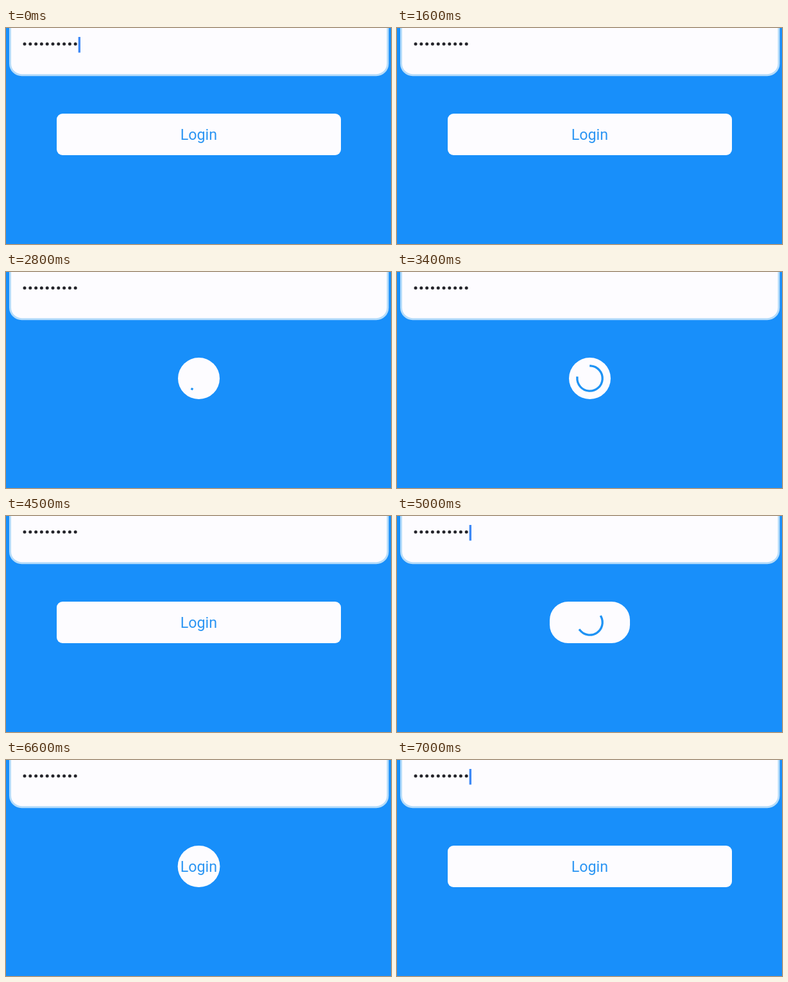
Animation, 600 px wide and 338 px high, one loop 7.1 s. Source, as an HTML page:

```html
<!DOCTYPE html>
<html lang="en">
<head>
<meta charset="utf-8">
<title>Login button</title>
<style>
html, body { margin: 0; width: 100%; height: 100%; overflow: hidden; background: #188ffa; }
svg { display: block; width: 100vw; height: 100vh; }
text { font: 23.2px Roboto, sans-serif; fill: #2b95f3; text-anchor: middle; }
</style>
</head>
<body>
<svg viewBox="0 0 600 338">
  <rect width="600" height="338" fill="#188ffa"/>
  <rect x="6.5" y="-60" width="588.5" height="133.7" rx="18" fill="#fdfcff" stroke="#b5dcfa" stroke-width="3"/>
  <g id="dots" fill="#24242a"></g>
  <rect id="caret" x="112.6" y="14" width="3.4" height="24.5" fill="#3f8af6"/>
  <rect id="button" y="134" height="65" fill="#fdfcff"/>
  <text id="label" x="300.4" y="175.3">Login</text>
  <path id="spinner" fill="none" stroke="#1f93f4" stroke-width="3.3" stroke-linecap="square"/>
</svg>
<script>
const LOOP = 7100, STEP = 100;
const CX = 300.5, CY = 166.5, RADIUS = 19.7;
const WIDE = 443, ROUND = 65, FOLD = 300, LAG = 30;
const SPEED = 1.1;                       // spinner clock against the wall clock
const ARC_PERIOD = 1333, TURN_PERIOD = 2222;
const loads = [[1602, 3440], [4753, 6590]];

const $ = id => document.getElementById(id);
const clamp = x => Math.min(1, Math.max(0, x));
const mix = (a, b, k) => a + (b - a) * k;

function bezier(x1, y1, x2, y2) {
  const at = (a, b, s) => 3 * (1 - s) * (1 - s) * s * a + 3 * (1 - s) * s * s * b + s * s * s;
  return x => {
    x = clamp(x);
    let lo = 0, hi = 1;
    for (let i = 0; i < 24; i++) {
      const mid = (lo + hi) / 2;
      if (at(x1, x2, mid) < x) lo = mid; else hi = mid;
    }
    return at(y1, y2, (lo + hi) / 2);
  };
}
const easeInOut = bezier(0.42, 0, 0.58, 1);
const fastOutSlowIn = bezier(0.4, 0, 0.2, 1);

function point(deg) {
  const a = deg * Math.PI / 180;
  return (CX + RADIUS * Math.cos(a)).toFixed(2) + " " + (CY + RADIUS * Math.sin(a)).toFixed(2);
}

function arc(ms) {
  const phase = ms / ARC_PERIOD % 1;
  const head = fastOutSlowIn(phase * 2), tail = fastOutSlowIn(phase * 2 - 1);
  const start = -90 + 270 * tail + 360 * ms / TURN_PERIOD + 90 * phase;
  const sweep = Math.max(270 * (head - tail), 0.2);
  return `M${point(start)}A${RADIUS} ${RADIUS} 0 ${sweep > 180 ? 1 : 0} 1 ${point(start + sweep)}`;
}

function draw(t) {
  let fold = 0;
  for (const [on, off] of loads) {
    fold += easeInOut((t - on - LAG) / FOLD) - easeInOut((t - off) / FOLD);
  }
  const load = loads.find(([on, off]) => t >= on && t < off);
  const width = mix(WIDE, ROUND, fold);
  $("button").setAttribute("x", CX - width / 2);
  $("button").setAttribute("width", width);
  $("button").setAttribute("rx", mix(9, ROUND / 2, fold));
  $("label").setAttribute("visibility", load ? "hidden" : "visible");
  $("spinner").setAttribute("d", load ? arc((t - load[0]) * SPEED) : "");
  $("caret").setAttribute("visibility", (t + 100) % 1000 < 500 ? "visible" : "hidden");
}

for (let i = 0; i < 10; i++) {
  const dot = document.createElementNS("http://www.w3.org/2000/svg", "circle");
  dot.setAttribute("cx", 29 + i * 8.8);
  dot.setAttribute("cy", 25);
  dot.setAttribute("r", 2.5);
  $("dots").append(dot);
}

let begin = null;
function frame(now) {
  if (begin === null) begin = now;
  const t = Math.max(0, now - begin) % LOOP;
  draw(Math.floor(t / STEP) * STEP);
  requestAnimationFrame(frame);
}
draw(0);
requestAnimationFrame(frame);
</script>
</body>
</html>
```
